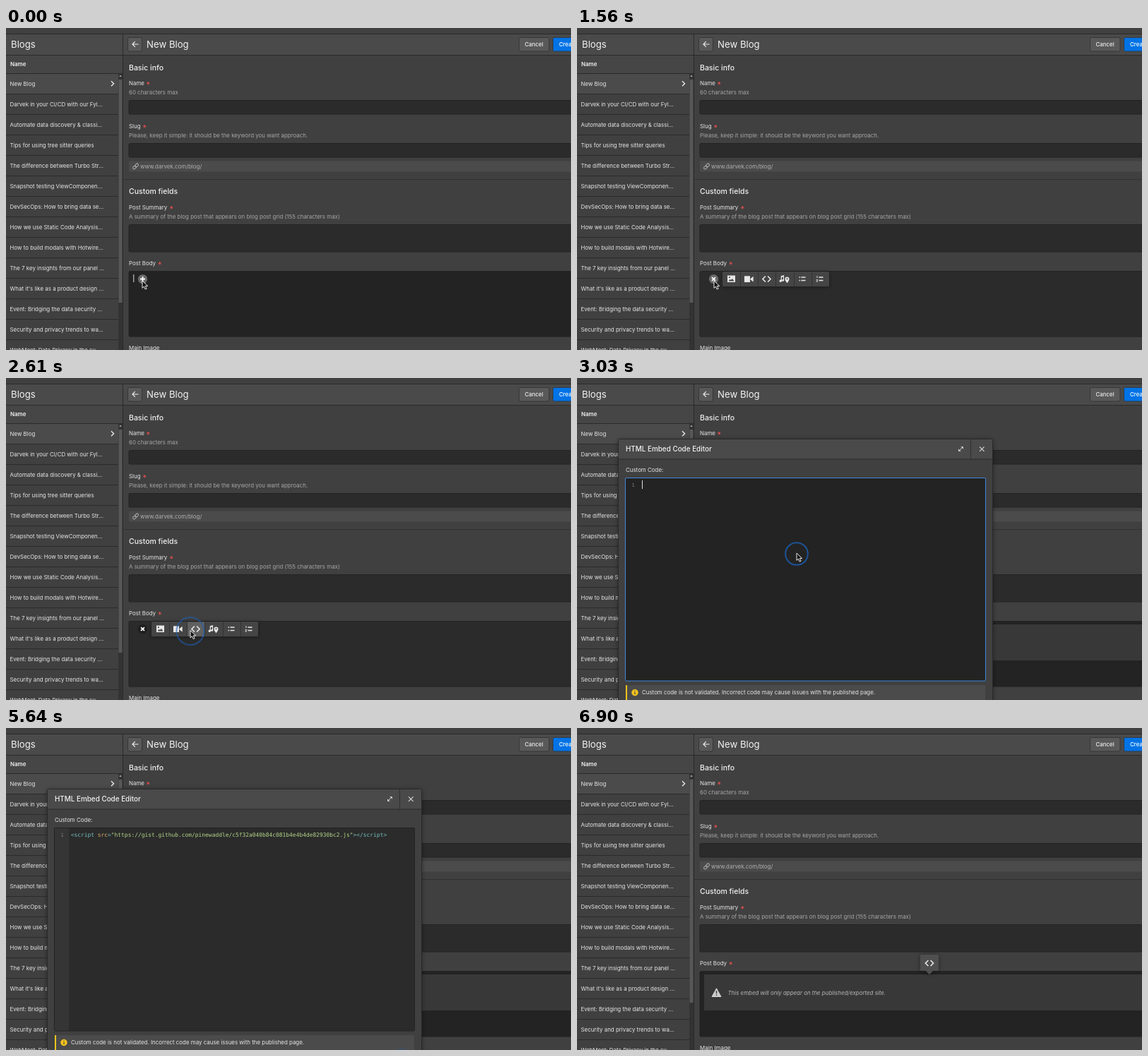
These frames come from a looping animation (800x456 px, 7.98 s). An HTML page:

```html
<!DOCTYPE html>
<html lang="en">
<head>
<meta charset="utf-8">
<title>New blog embed</title>
<style>
  html, body { margin: 0; width: 100%; height: 100%; overflow: hidden; background: #404040; }
  svg { display: block; width: 100vw; height: 100vh; }
  text { font-family: Inter, Roboto, sans-serif; white-space: pre; }
  .code text { font-family: "DejaVu Sans Mono", "Liberation Mono", monospace; }
</style>
</head>
<body>
<svg id="stage" viewBox="0 0 800 456"></svg>
<script>
const LOOP = 7980, STEP = 30;
const UI = 7.92;

const rect = (x, y, w, h, fill, more = '') =>
  `<rect x="${x}" y="${y}" width="${w}" height="${h}" fill="${fill}" ${more}/>`;
const path = (d, more = '') => `<path d="${d}" ${more}/>`;
const line = (d, color, width = 1, more = '') =>
  path(d, `fill="none" stroke="${color}" stroke-width="${width}" ${more}`);
const group = (id, body, more = '') => `<g id="${id}" ${more}>${body}</g>`;
// y is the middle of the capitals
const text = (x, y, str, fill = '#e6e6e6', size = UI, more = '') =>
  `<text x="${x}" y="${y + size * 0.36}" fill="${fill}" font-size="${size}" ${more}>${str}</text>`;
const medium = 'font-weight="500"';
const brackets = (x, y, gap = 1.6) => line(
  `M${x - gap} ${y - 4}l-4 4 4 4M${x + gap} ${y - 4}l4 4-4 4`, '#eee', 1.5);

function sidebar() {
  const posts = [
    'New Blog', 'Darvek in your CI/CD with our Fyl...', 'Automate data discovery &amp; classi...',
    'Tips for using tree sitter queries', 'The difference between Turbo Str...',
    'Snapshot testing ViewComponen...', 'DevSecOps: How to bring data se...',
    'How we use Static Code Analysis...', 'How to build modals with Hotwire...',
    'The 7 key insights from our panel ...', "What it's like as a product design ...",
    'Event: Bridging the data security ...', 'Security and privacy trends to wa...',
    'WebMeet: Data Privacy in the su...'];
  const rows = posts.map((post, i) => {
    const y = 79 + i * 29;
    return text(5.5, y, post) + rect(0, y + 14, 159, 1, '#2b2b2b');
  }).join('');
  return rect(0, 9, 165, 29, '#4a4a4a') + text(7, 23.3, 'Blogs', '#f2f2f2', 13.2)
    + rect(0, 38, 165, 1, '#2b2b2b') + rect(0, 39, 165, 25, '#464646')
    + text(6, 51.3, 'Name', '#f2f2f2', UI, 'font-weight="600"')
    + rect(0, 64, 165, 1, '#2b2b2b') + rect(0, 65, 159, 28, '#4b4b4b') + rows
    + line('M149 75.3l3.6 3.5-3.6 3.5', '#eee', 1.3)
    + rect(159, 65, 6, 391, '#333') + rect(159.5, 73, 5, 316, '#585858')
    + path('M160.3 69l1.7-2.5 1.7 2.5z', 'fill="#aaa"')
    + rect(165, 9, 1, 447, '#2a2a2a');
}

const field = (y, h, id = '') =>
  rect(174, y + .5, 640, h - 1, '#2b2b2b', `id="${id}" stroke="#222" rx="1.5"`);
const label = (y, str, starX) => text(174, y, str)
  + text(starX, y + 1.6, '*', '#f0504f', 11);
const hint = (y, str) => text(174, y, str, '#a6a6a6');

function form() {
  return rect(166, 9, 634, 29, '#4a4a4a') + rect(166, 38, 634, 1, '#2b2b2b')
    + rect(172.5, 13.5, 20, 19.5, '#595959', 'rx="2" stroke="#363636"')
    + line('M187.5 23h-8.4M182.8 19.2l-3.8 3.8 3.8 3.8', '#eee', 1.2)
    + text(199, 23.3, 'New Blog', '#f2f2f2', 13.2)
    + rect(726.5, 13.5, 42.5, 19.5, '#595959', 'rx="2" stroke="#363636"')
    + text(734.5, 23.2, 'Cancel', '#eee', UI, medium)
    + rect(774.5, 13.5, 50, 19.5, '#0073e6', 'rx="2" stroke="#2f3c4a"')
    + text(783, 23.2, 'Create', '#fff', UI, medium)
    + text(174, 56, 'Basic info', '#f2f2f2', 10.5, medium)
    + label(78, 'Name', 198.5) + hint(91.3, '60 characters max') + field(102, 20.5)
    + label(139, 'Slug', 193.5)
    + hint(152.2, 'Please, keep it simple: it should be the keyword you want approach.') + field(163, 20.5)
    + rect(174, 188.5, 640, 15, '#4b4b4b', 'rx="1.5"')
    + `<g transform="rotate(-45 183.5 196)" fill="none" stroke="#aaa">
        <rect x="178.6" y="194.2" width="5.4" height="3.6" rx="1.8"/>
        <rect x="183" y="194.2" width="5.4" height="3.6" rx="1.8"/></g>`
    + text(190, 196.2, 'www.darvek.com/blog/', '#b0b0b0')
    + rect(166, 214, 634, 1, '#303030')
    + text(174, 231.7, 'Custom fields', '#f2f2f2', 10.5, medium)
    + label(254, 'Post Summary', 231.5)
    + hint(267.3, 'A summary of the blog post that appears on blog post grid (155 characters max)')
    + field(278, 39.5)
    + label(333, 'Post Body', 215) + field(344, 93.5, 'body') + text(174, 453.3, 'Main Image');
}

function insertButton() {
  return `<circle id="knob" cx="193.5" cy="355.5" r="6.6"/>`
    + line('M190 355.5h7M193.5 352v7', '#fff', 1.8, 'id="plus"');
}

function toolbar() {
  const icons = `<g fill="#e8e8e8">`
    + path('M213 350.5h11v9.5h-11zM214.5 358.5h8l-2.6-3.6-2 2.2-1.3-1.3zM215 352.3v1.8h1.8v-1.8z', 'fill-rule="evenodd"')
    + path('M237 351.3h8v8.6h-8zM245.5 355l4.2-3.2v7.6l-4.2-3.2z')
    + path('M288.7 351.3l4.4-1.3v7.2h-1.2v-4.8l-2 .6v5.2h-1.2z')
    + '<circle cx="288.3" cy="358.2" r="1.7"/><circle cx="291.6" cy="357.3" r="1.5"/>'
    + path('M297.5 361.2c-2-3-3-4-3-5.8a3 3 0 0 1 6 0c0 1.800-1 2.800-3 5.800z')
    + '</g><circle cx="297.500" cy="355.200" r="1" fill="#454545"/>'
    + line('M317.500 353h6M317.500 357.500h6M342.500 353h6M342.500 357.500h6', '#e8e8e8', 1.4)
    + line('M314.500 353h1.600M314.500 357.500h1.600', '#e8e8e8', 1.6)
    + line('M340 351v3M338.800 356.500h2l-2 2.500h2.200', '#e8e8e8', .9);
  const gaps = [231, 256, 281, 307, 332].map(x => rect(x, 345.5, 1, 20.500, '#333')).join('');
  return rect(206, 345, 151, 21, '#454545', 'rx="2" filter="url(#soft)"')
    + rect(257, 345.500, 24, 20.500, '#606060', 'id="hover"') + gaps + icons + brackets(268.500, 355.500);
}

function embed() {
  return rect(180, 349, 620, 51, '#383838')
    + path('M197.500 368.800l6.500 11.700h-13z', 'fill="#cfcfcf" stroke="#cfcfcf" stroke-linejoin="round"')
    + line('M197.500 372v4.300M197.500 377.600v1.500', '#383838', 1.4)
    + text(213.500, 374.700, 'This embed will only appear on the published/exported site.', '#b8b8b8', UI, 'font-style="italic"')
    + path('M488 321h22q2 0 2 2v19q0 2-2 2h-6l-5 5-5-5h-6q-2 0-2-2v-19q0-2 2-2z', 'fill="#505050" filter="url(#soft)"')
    + brackets(499, 333);
}

function modal() {
  const span = (color, str) => `<tspan fill="${color}">${str}</tspan>`;
  const teal = '#72bdb8';
  const code = span(teal, '&lt;script ') + span('#d9b06c', 'src') + span(teal, '=')
    + span('#b4d68a', '"https://gist.github.com/pinewaddle/c5f32a040b84c081b4e4b4de82930bc2.js"')
    + span(teal, '&gt;&lt;/script&gt;');
  return rect(58.500, 86.500, 530, 400, '#404040', 'rx="2" stroke="#2b2b2b" filter="url(#soft)"')
    + rect(59, 87, 529, 28, '#4a4a4a') + rect(59, 114.500, 529, 1, '#2b2b2b') + rect(557, 87, 1, 28, '#2f2f2f')
    + text(69, 100.700, 'HTML Embed Code Editor', '#f2f2f2', 9.9, medium)
    + line('M541 103l5-5M543.700 97.600h2.700v2.700M540.600 100.700v2.700h2.700', '#ddd', 1)
    + line('M570 97.300l6.600 6.600M576.600 97.300l-6.600 6.600', '#d8d8d8', 1.1)
    + text(69, 129.700, 'Custom Code:')
    + rect(68.500, 141.500, 510, 287.500, '#2b2b2b', 'id="editor" rx="1.500"')
    + rect(69, 142, 20, 286.500, '#353535', 'id="gutter"')
    + group('', text(77.500, 151.300, '1', '#808080', 7)
      + text(91.700, 151.300, code, teal, 7.92, 'id="code"'), 'class="code"')
    + rect(92, 145, 1, 12, '#ddd', 'id="editorCaret"')
    + rect(69, 435, 509, 30, '#4b4b4b') + rect(69, 435, 2, 30, '#f5c31c')
    + '<circle cx="82" cy="445.500" r="4.700" fill="#f5c31c"/>'
    + line('M82 444.800v3.200M82 442.500v1.300', '#4b4b4b', 1.3)
    + text(92, 445.500, 'Custom code is not validated. Incorrect code may cause issues with the published page.');
}

document.getElementById('stage').innerHTML =
  `<defs><filter id="soft" x="-50%" y="-50%" width="200%" height="200%">
    <feDropShadow dx="0" dy="1" stdDeviation="3" flood-opacity=".4"/></filter></defs>`
  + rect(0, 0, 800, 456, '#404040') + rect(0, 8, 800, 1, '#2a2a2a')
  + sidebar() + form()
  + rect(180.300, 349, 1, 11, '#ddd', 'id="bodyCaret"')
  + group('tools', toolbar()) + group('insert', insertButton())
  + group('embed', embed()) + group('modal', modal())
  + '<circle id="ring" fill="none" stroke="#1d60b8" stroke-width="2"/>'
  + path('M0 0v10.300l2.400-2.200 1.800 3.900 1.900-.8-1.800-3.800h3.400z',
    'id="cursor" fill="#111" stroke="#fff" stroke-width=".9" stroke-linejoin="round"');

const el = Object.fromEntries([...document.querySelectorAll('svg [id]')].map(e => [e.id, e]));
const set = (name, attrs) => {
  for (const key in attrs) el[name].setAttribute(key, attrs[key]);
};
const show = (name, on) => set(name, { visibility: on ? 'visible' : 'hidden' });

const ramp = (t, from, to) => Math.min(1, Math.max(0, (t - from) / (to - from)));
const smooth = p => p * p * (3 - 2 * p);
const within = (t, spans) => spans.some(([from, to]) => t >= from && t < to);

// from, to, x, y
const MOVES = [
  [1530, 1950, 261, 357.500], [2610, 2880, 311, 248],
  [4170, 4520, 560, 476], [6600, 6890, 636, 366]];
const CLICKS = [990, 2400, 2880, 5370];
const OPEN_TOOLS = 1140, INSERT = 2640, FOCUS = 2910, PASTE = 3720, BLUR = 5400;

function cursorAt(t) {
  let x = 193, y = 358;
  for (const [from, to, nextX, nextY] of MOVES) {
    const p = smooth(ramp(t, from, to));
    x += (nextX - x) * p;
    y += (nextY - y) * p;
  }
  return { x, y };
}

function drawPointer(t) {
  const { x, y } = cursorAt(t);
  set('cursor', { transform: `translate(${x} ${y})` });
  show('cursor', t < 6890);
  const click = CLICKS.find(c => t > c && t < c + 330);
  show('ring', click !== undefined);
  if (click !== undefined) {
    const p = (t - click) / 330, at = cursorAt(click);
    set('ring', { cx: at.x, cy: at.y + 1, r: 22.500 * (1 - (1 - p) ** 2), opacity: 1 - p * p });
  }
  return x;
}

function draw(t) {
  const x = drawPointer(t);
  const tools = within(t, [[OPEN_TOOLS, INSERT]]);
  const focused = within(t, [[FOCUS, BLUR]]);

  show('bodyCaret', within(t, [[0, 330], [810, OPEN_TOOLS]]));
  show('tools', tools);
  show('hover', tools && x > 256);
  show('insert', t < INSERT);
  set('knob', { fill: x < 200 ? '#6a6a6a' : '#1e1e1e' });
  set('plus', { transform: `rotate(${45 * ramp(t, OPEN_TOOLS - 60, OPEN_TOOLS + 60)} 193.500 355.500)` });
  set('body', { fill: tools ? '#2b2b2b' : '#232323' });
  show('embed', t >= INSERT);

  set('modal', { opacity: ramp(t, INSERT, INSERT + 120) * (1 - ramp(t, 5700, 5820)) });
  set('editor', { fill: focused ? '#232323' : '#2b2b2b', stroke: focused ? '#3f86dc' : '#222' });
  show('gutter', !focused);
  show('code', t >= PASTE);
  set('editorCaret', { x: t < PASTE ? 92 : 539.500 });
  show('editorCaret', within(t, [[FOCUS, 3420], [PASTE, 4200], [4650, 5130]]));
}

const start = performance.now();
function tick() {
  const t = (performance.now() - start) % LOOP;
  draw(Math.floor(t / STEP) * STEP);
  requestAnimationFrame(tick);
}
tick();
</script>
</body>
</html>
```
